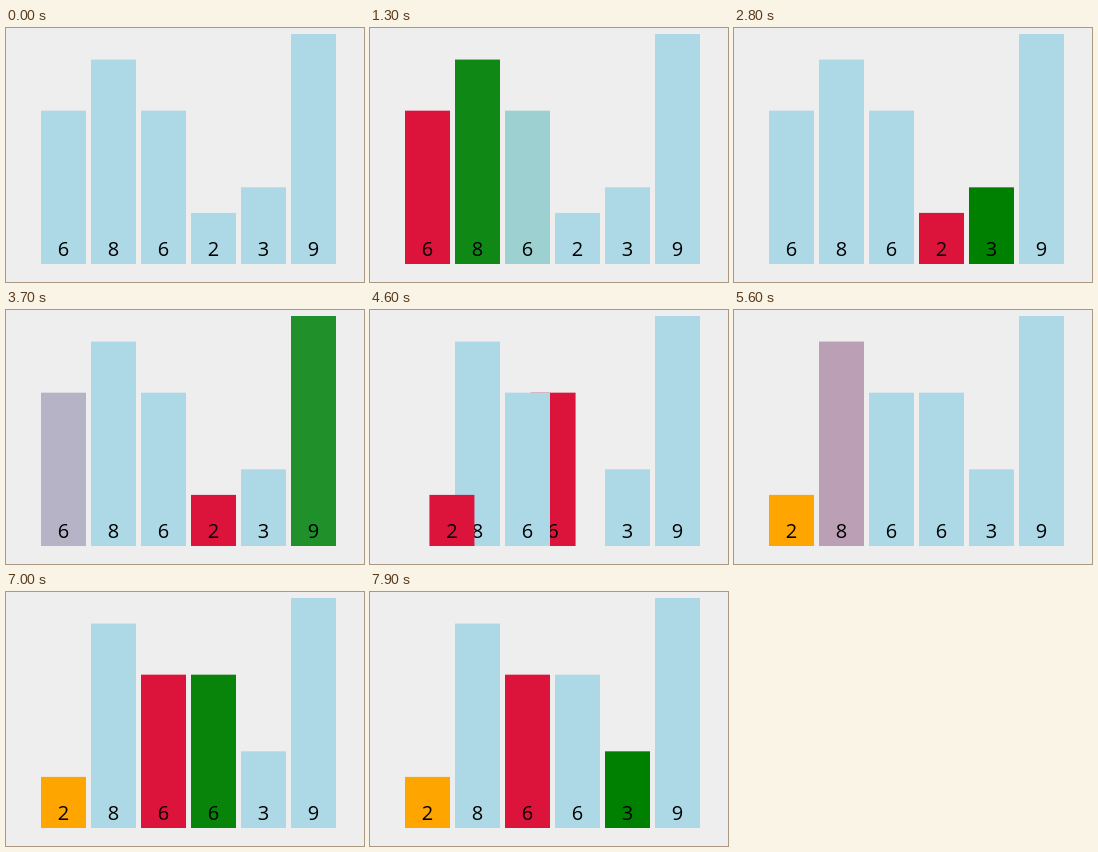
Recreate the animation shown at these times as an HTML page with a canvas. Size 358 by 254 pixels, loop 8 s.

```html
<!DOCTYPE html>
<html lang="en">
<head>
<meta charset="utf-8">
<title>Selection sort</title>
<style>
  html, body { margin: 0; width: 100%; height: 100%; overflow: hidden; background: #eee; }
  canvas { display: block; }
</style>
</head>
<body>
<canvas id="stage" width="358" height="254"></canvas>
<script>
const ctx = document.getElementById('stage').getContext('2d');
const LOOP = 8000, STEP = 100, FADE = 250;
const BASE = 236, UNIT = 230 / 9, BAR_WIDTH = 45, PITCH = 50, LEFT = 35;

const IDLE = [173, 216, 230];
const MIN = [220, 20, 60];
const COMPARE = [0, 128, 0];
const SORTED = [255, 165, 0];

// Colour changes are [start time, colour]; move is [start time, new slot].
const bars = [
  { value: 6, move: [4436, 3], colors: [[160, MIN], [2281, IDLE], [3610, MIN], [4701, IDLE], [6806, COMPARE], [7650, IDLE]] },
  { value: 8, colors: [[410, COMPARE], [1229, IDLE], [5496, MIN], [6541, IDLE]] },
  { value: 6, colors: [[1229, COMPARE], [1495, IDLE], [5761, COMPARE], [6541, MIN]] },
  { value: 2, move: [4436, 0], colors: [[1495, COMPARE], [2281, MIN], [4701, SORTED]] },
  { value: 3, colors: [[2546, COMPARE], [3350, IDLE], [7650, COMPARE]] },
  { value: 9, colors: [[3350, COMPARE], [3610, IDLE]] }
];

// The picture advances in 100 ms steps inside these spans and rests between them.
const active = [[300, 600], [1300, 1700], [2400, 2500], [2700, 2800], [3500, 3800],
  [4500, 4900], [5600, 5700], [5900, 6000], [6700, 7000], [7800, 7900]];

function steppedTime(ms) {
  const span = active.filter(([start]) => start <= ms).pop();
  return span ? Math.min(Math.floor(ms / STEP) * STEP, span[1]) : 0;
}

function progress(t, start) {
  const p = Math.min(1, Math.max(0, (t - start) / FADE));
  return p < 0.5 ? 4 * p ** 3 : 1 - 4 * (1 - p) ** 3;
}

const mix = (a, b, k) => a + (b - a) * k;

function colorAt(bar, t) {
  const rgb = bar.colors.reduce((from, [start, to]) => {
    const k = progress(t, start);
    return from.map((c, i) => mix(c, to[i], k));
  }, IDLE);
  return `rgb(${rgb.map(Math.round).join(',')})`;
}

function drawBar(bar, index, t) {
  const slot = bar.move ? mix(index, bar.move[1], progress(t, bar.move[0])) : index;
  const x = LEFT + PITCH * slot;
  const height = bar.value * UNIT;
  ctx.fillStyle = colorAt(bar, t);
  ctx.fillRect(x, BASE - height, BAR_WIDTH, height);
  ctx.fillStyle = '#000';
  ctx.fillText(bar.value, x + BAR_WIDTH / 2, 228);
}

function render(now) {
  const t = steppedTime(now % LOOP);
  ctx.fillStyle = '#eee';
  ctx.fillRect(0, 0, 358, 254);
  ctx.font = '20px "Open Sans", "Noto Sans", sans-serif';
  ctx.textAlign = 'center';
  bars.forEach((bar, i) => drawBar(bar, i, t));
}

let origin;
function tick(now) {
  origin ??= now;
  render(now - origin);
  requestAnimationFrame(tick);
}
render(0);
requestAnimationFrame(tick);
</script>
</body>
</html>
```
